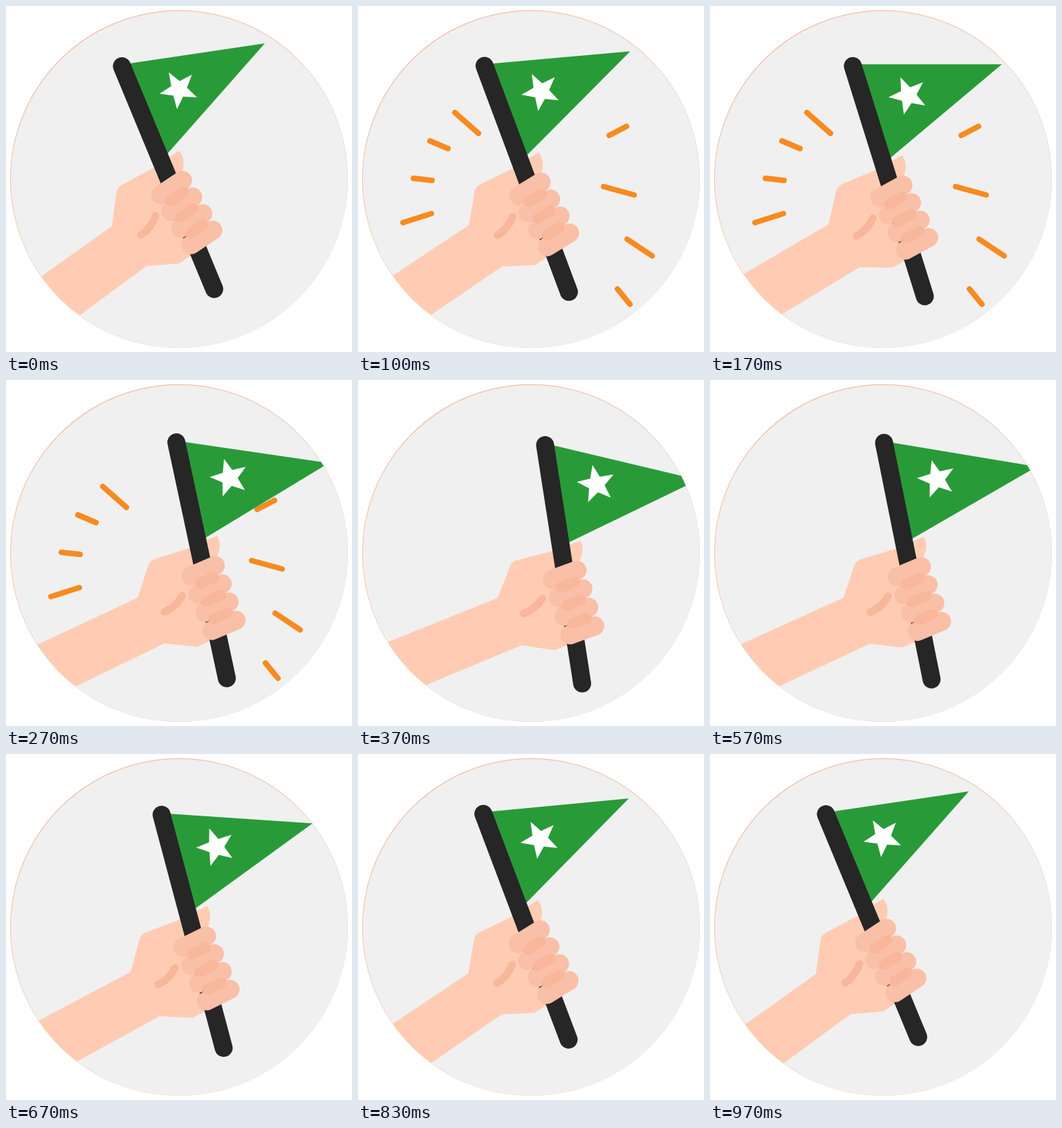
An HTML page with a canvas that plays this animation: 500x500 px, repeating every 1.01 s.

```html
<!DOCTYPE html>
<html lang="en">
<head>
<meta charset="utf-8">
<title>Waving flag</title>
<style>
  html, body { margin: 0; width: 100%; height: 100%; overflow: hidden; background: #fff; }
  canvas { display: block; width: 500px; height: 500px; }
</style>
</head>
<body>
<canvas id="stage" width="500" height="500"></canvas>
<script>
const ctx = document.getElementById('stage').getContext('2d');
const LOOP = 1010, STEPS = 30, PEAK = 12, REST = 29;
const RAD = Math.PI / 180;
const SKIN = '#ffccb3', FINGER = '#f9bfa7', CREASE = '#f8b69b';
const GREEN = '#289b38', POLE = '#262626', ORANGE = '#f68b1f';

const SPARKS = [
  [140, 154, 174, 184], [104, 195, 130, 206], [80, 249, 107, 252], [65, 313, 106, 300],
  [363, 187, 388, 174], [355, 261, 399, 273], [389, 337, 425, 361], [375, 409, 393, 431]
];

const stepStart = i => Math.round(i * 10 / 3) * 10;

function stepAt(t) {
  let i = STEPS - 1;
  while (stepStart(i) > t) i--;
  return i;
}

// Swing from 0 to 1 and back, eased like a cosine
function swing(i) {
  const p = i < PEAK ? i / PEAK : 1 + (i - PEAK) / (REST - PEAK);
  return (1 - Math.cos(Math.PI * p)) / 2;
}

function disc(x, y, r, color) {
  ctx.beginPath();
  ctx.arc(x, y, r, 0, 7);
  ctx.fillStyle = color;
  ctx.fill();
}

function bar(x1, y1, x2, y2, width, color) {
  ctx.beginPath();
  ctx.moveTo(x1, y1);
  ctx.lineTo(x2, y2);
  ctx.lineWidth = width;
  ctx.strokeStyle = color;
  ctx.stroke();
}

function shape(points, color) {
  ctx.beginPath();
  points.forEach(([x, y]) => ctx.lineTo(x, y));
  ctx.closePath();
  ctx.fillStyle = color;
  ctx.fill();
}

function turn(x, y, deg) {
  ctx.translate(x, y);
  ctx.rotate(deg * RAD);
  ctx.translate(-x, -y);
}

const palm = new Path2D(
  'M-40 455.6 L153 318 L159.5 270 Q160 262 168 258 L213 234 L250 209 ' +
  'Q261 222 254 242 L265 290 L282 338 L268 360 L250.5 372 L203 376 L10 518 Z');
const crease = new Path2D('M216 303.5 Q210 321 195 331');

const star = Array.from({ length: 10 }, (_, i) => {
  const a = (117.9 + i * 36) * RAD, r = i % 2 ? 12 : 28.5;
  return [63.2 + r * Math.cos(a), 62.5 + r * Math.sin(a)];
});

// Local axes: x across the pole, y down along it
function drawFlag(k) {
  ctx.save();
  ctx.translate(167.5, 87);
  ctx.rotate(-22.5 * RAD);
  shape([[0, -2.5], [203.4 + 7.7 * k, 48.6 + 35.7 * k], [0, 148]], GREEN);
  ctx.save();
  turn(15, 78, 5.7 * k);
  shape(star, '#fff');
  ctx.restore();
  bar(0, 0, 0, 348.6, 26, POLE);
  ctx.restore();
}

function drawFingers() {
  for (let i = 0; i < 4; i++) {
    const x = 223.5 + i * 14.6, y = 273 + i * 24;
    bar(x, y, x + 31.5, y - 21, 27.6, FINGER);
  }
  for (let i = 0; i < 3; i++) {
    const x = 238 + i * 14.4, y = 281 + i * 23.6;
    bar(x, y, x + 18, y - 12, 15, CREASE);
  }
}

function draw(i) {
  const k = swing(i);
  ctx.clearRect(0, 0, 500, 500);
  ctx.lineCap = 'round';
  disc(250, 250, 244, '#f2c0a8');
  disc(250.4, 250.6, 243.4, '#f0f0f0');

  ctx.save();
  ctx.beginPath();
  ctx.arc(250, 250, 244, 0, 7);
  ctx.clip();
  if (i >= 3 && i <= 8) SPARKS.forEach(s => bar(...s, 8, ORANGE));
  turn(189.7, 519.8, 13.9 * k);
  ctx.fillStyle = SKIN;
  ctx.fill(palm);
  ctx.lineWidth = 11;
  ctx.strokeStyle = CREASE;
  ctx.stroke(crease);
  drawFlag(k);
  drawFingers();
  ctx.restore();
}

const begin = performance.now();
function tick() {
  draw(stepAt((performance.now() - begin) % LOOP));
  requestAnimationFrame(tick);
}
tick();
</script>
</body>
</html>
```
